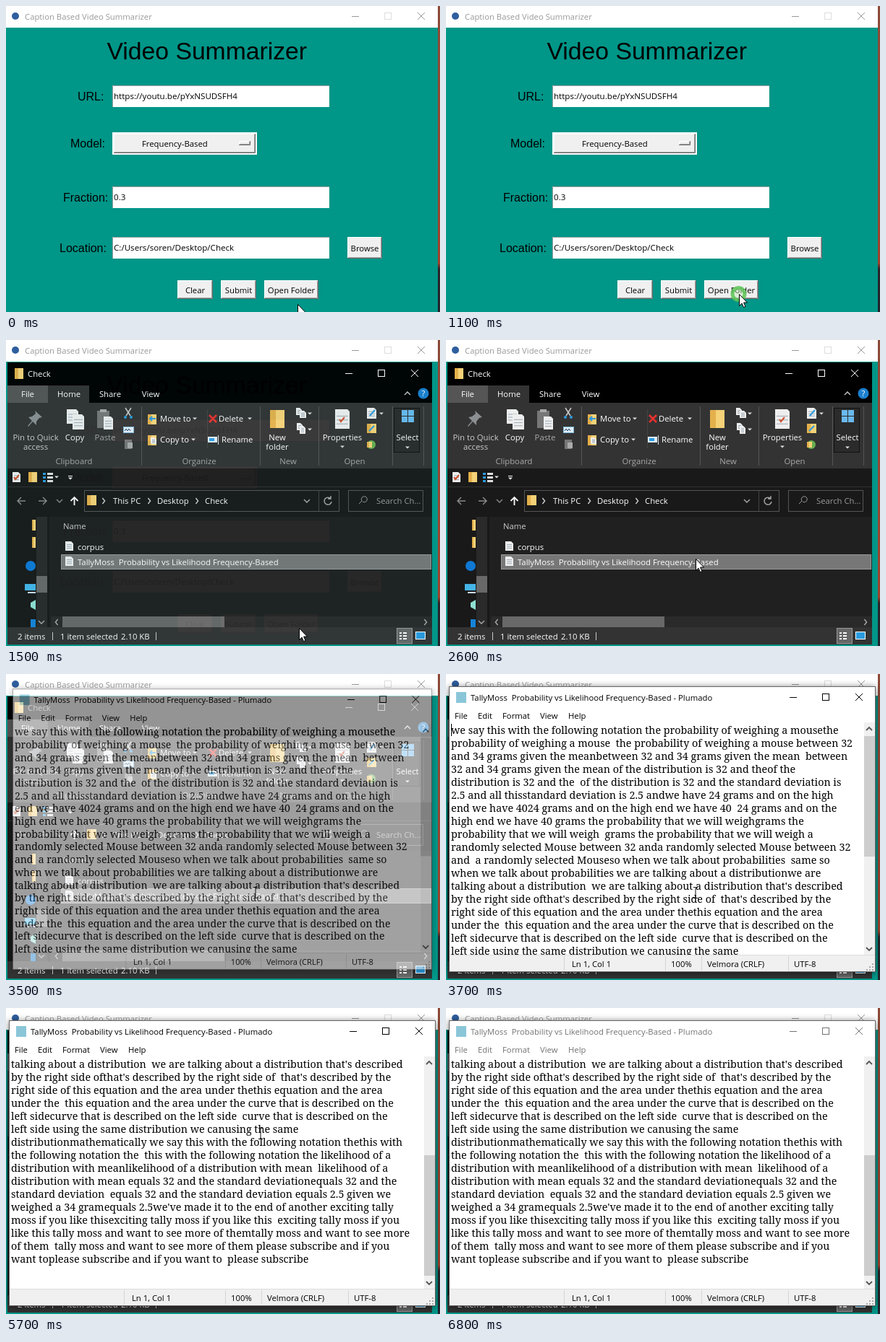
An HTML page that plays this animation: 600 by 424 pixels, repeating every 7.1 s.

```html
<!DOCTYPE html>
<html lang="en">
<head>
<meta charset="utf-8">
<style>
html, body { margin: 0; width: 100%; height: 100%; overflow: hidden; background: #009688; }
svg { display: block; }
text { white-space: pre; font: 11.3px "Open Sans", "Noto Sans", sans-serif; }
.entry { font-size: 11.6px; }
.label { font: 16px "Liberation Sans", Arial, sans-serif; }
.heading { font: 33.7px "Liberation Sans", Arial, sans-serif; }
.note { font: 14.3px "Noto Serif", "DejaVu Serif", serif; }
#pad { transform-origin: 299px 215px; filter: drop-shadow(0 1px 5px #0008); }
</style>
</head>
<body>
<svg id="stage" width="600" height="424" viewBox="0 0 600 424"></svg>
<script>
// Markup helpers
const rect = (x, y, w, h, fill, extra = '') =>
  `<rect x="${x}" y="${y}" width="${w}" height="${h}" fill="${fill}" ${extra}/>`;
const line = (d, color = '#fff', width = 1) =>
  `<path d="${d}" fill="none" stroke="${color}" stroke-width="${width}"/>`;
const shape = (d, fill) => `<path d="${d}" fill="${fill}"/>`;
const disc = (x, y, r, fill) => `<circle cx="${x}" cy="${y}" r="${r}" fill="${fill}"/>`;
const text = (x, y, s, fill = '#000', cls = '', anchor = 'start') =>
  `<text x="${x}" y="${y}" fill="${fill}" class="${cls}" text-anchor="${anchor}">${s}</text>`;
const mid = (x, y, s, fill = '#000') => text(x, y, s, fill, '', 'middle');
const group = (id, body, extra = '') => `<g id="${id}" ${extra}>${body}</g>`;
const box = (x, y, w, h, color, fill = 'none') =>
  rect(x + .5, y + .5, w - 1, h - 1, fill, `stroke="${color}"`);
const drop = (x, y, color = '#ddd') => shape(`M${x - 3} ${y - 1.5}h6l-3 3z`, color);
const chevron = (x, y, dx, dy, color = '#aaa', w = 1.4) => line(dx
  ? `M${x - 2 * dx} ${y - 4}l${4 * dx} 4l${-4 * dx} 4`
  : `M${x - 4} ${y - 2 * dy}l4 ${4 * dy}l4 ${-4 * dy}`, color, w);
const controls = (x, y, color, maxColor = color) =>
  line(`M${x} ${y + .5}h10M${x + 91} ${y - 5}l10 10m0 -10l-10 10`, color) +
  box(x + 45, y - 5, 10, 10, maxColor);

// Main form
const bevel = (x, y, w, h) => rect(x, y, w, h, '#f0f0f0') +
  line(`M${x + .5} ${y + h}V${y + .5}H${x + w}`) +
  line(`M${x + 1} ${y + h - 1.5}H${x + w - 1.5}V${y + 1}`, '#a0a0a0') +
  line(`M${x} ${y + h - .5}H${x + w - .5}V${y}`, '#696969');
const button = (x, y, w, h, s) => bevel(x, y, w, h) + mid(x + w / 2, y + h / 2 + 4.5, s);
const entry = (y, s) => rect(147, y, 300, 30, '#fff') +
  line(`M147.5 ${y + 30}V${y + .5}H447`, '#a0a0a0') + text(149, y + 19, s, '#000', 'entry');

const form = rect(0, 0, 597, 30, '#fff') + rect(597, 0, 3, 424, 'url(#edge)') +
  rect(0, 30, 597, 394, '#009688') + disc(13, 14, 5, '#2f5f9e') +
  text(26, 19, 'Caption Based Video Summarizer', '#999') + controls(478, 14, '#999', '#ddd') +
  text(139.5, 74, 'Video Summarizer', '#000', 'heading') +
  [[99, 131, 'URL:'], [89, 196, 'Model:'], [79, 271, 'Fraction:'], [74, 341, 'Location:']]
    .map(([x, y, s]) => text(x, y, s, '#000', 'label')).join('') +
  entry(110, 'https://youtu.be/pYxNSUDSFH4') + entry(250, '0.3') +
  entry(320, 'C:/Users/soren/Desktop/Check') +
  rect(147, 175, 200, 31, '#fff') + bevel(149, 177, 196, 27) + bevel(322, 187, 16, 6) +
  text(188, 195, 'Frequency-Based') +
  button(472, 320, 48, 30, 'Browse') + button(237, 380, 49, 26, 'Clear') +
  button(297, 380, 49, 26, 'Submit') + button(357, 380, 75, 26, 'Open Folder');

// File browser
const yellow = '#f5d177', blue = '#2b9be0';
const folder = (x, y, w = 13, h = 14) => rect(x, y, w, h, yellow) + rect(x, y, w / 2.5, h, '#e3b04b');
const page = (x, y, w = 11, h = 13) => shape(`M${x} ${y}h${w - 3}l3 3v${h - 3}h${-w}z`, '#eee') +
  [.35, .55, .75].map(k => line(`M${x + 2} ${y + h * k}h${w - 4}`, '#8a9aa8', .8)).join('');
const check = (x, y) => line(`M${x - 3} ${y}l2 3 5 -6`, '#d0502c', 2);

const ribbon = rect(2, 87, 587, 91, '#333') +
  [187, 351, 432, 534, 577].map(x => line(`M${x}.5 92v82`, '#555')).join('') +
  shape('M40 98l10 9-4 1-4 5 0 5-5-5-6 7-1-1 6-7-5-5 5-1 5-4z', '#8b8f92') +
  mid(41, 139, 'Pin to Quick', '#ccc') + mid(41, 152, 'access', '#ccc') +
  page(84, 96, 16, 20) + page(92, 103, 16, 21) + mid(95, 139, 'Copy', '#fff') +
  rect(126, 98, 17, 24, '#777') + rect(130, 96, 9, 4, '#aaa') + page(135, 106, 13, 18) +
  mid(137, 139, 'Paste', '#aaa') +
  line('M165 94l7 11m1 -11l-7 11', '#ccc', 1.5) + disc(165, 107, 2, blue) + disc(173, 107, 2, blue) +
  box(162, 120, 15, 9, '#7fb8dc', '#dfeefa') + line('M164 126l2 -3 2 3 2 -3 2 3', '#246', 1) +
  rect(164, 138, 10, 13, '#777') + rect(168, 142, 7, 8, '#aaa') +
  mid(94, 172, 'Clipboard', '#aaa') +
  folder(196, 103, 12) + line('M207 109h-8m3 -3l-3 3 3 3', blue, 2) + text(213, 113, 'Move to', '#fff') + drop(261, 109) +
  folder(196, 132, 12) + page(200, 135, 8, 9) + text(213, 142, 'Copy to', '#fff') + drop(259, 138) +
  line('M281 104l10 10m0 -10l-10 10', '#e0322e', 2.8) + text(294, 113, 'Delete', '#fff') + drop(337, 109) +
  rect(279, 134, 13, 8, '#dcecf8') + rect(281, 136, 7, 4, blue) + line('M293.5 132v13', '#ddd') +
  text(298, 142, 'Rename', '#fff') + line('M278.5 96v54', '#444') + mid(267, 172, 'Organize', '#aaa') +
  folder(365, 97, 20, 25) + mid(375, 139, 'New', '#fff') + mid(375, 152, 'folder', '#fff') +
  page(401, 94, 8, 10) + page(406, 98, 9, 10) + drop(420, 102) +
  page(402, 115, 8, 10) + page(406, 119, 8, 11) + drop(420, 124) + mid(390, 172, 'New', '#aaa') +
  page(455, 96, 20, 27) + check(464, 110) + mid(465, 139, 'Properties', '#fff') + drop(465, 148) +
  page(499, 94, 13, 15) + line('M503 105l7 -8', blue, 2) + drop(519, 102) +
  folder(499, 116, 13, 13) + line('M502 126l7 -7', blue, 2) +
  disc(505, 145, 6, '#69ae50') + folder(499, 141, 7, 8) + mid(482, 172, 'Open', '#aaa') +
  box(536, 94, 36, 62, '#111', '#2b2b2b') +
  [0, 9].map(a => [0, 9].map(b => rect(547 + a, 97 + b, 8, 8, '#69b9ef')).join('')).join('') +
  mid(555, 139, 'Select', '#fff') + drop(555, 149);

const explorer = rect(2, 31, 587, 391, '#202020') + rect(2, 31, 587, 57, '#000') +
  folder(12, 39, 12, 15) +
  group('active', text(30, 51, 'Check', '#fff') + controls(469, 46, '#fff')) +
  group('idle', text(30, 51, 'Check', '#999') + controls(469, 46, '#999')) +
  rect(2, 63, 56, 24, '#555') + rect(58, 63, 57, 24, '#333') +
  [[30, 'File'], [87, 'Home'], [144, 'Share'], [200, 'View']].map(([x, s]) => mid(x, 79, s, '#fff')).join('') +
  chevron(555, 74, 0, -1, '#ccc') + disc(577, 74, 7.5, '#1c80cf') + mid(577, 78, '?', '#fff') + ribbon +
  rect(2, 178, 587, 67, '#191919') + line('M2 203.5h587', '#303030') +
  page(9, 183, 11, 14) + check(14, 190) + folder(31, 183, 12) +
  [0, 5, 10].map(d => rect(51, 184 + d, 4, 3, blue) + rect(57, 184 + d, 8, 3, '#ddd')).join('') +
  drop(70, 190) + drop(89, 192, '#fff') + line('M86 188.5h6') +
  line('M27 223h-11m5 -5l-5 5 5 5M45 223h11m-5 -5l5 5 -5 5', '#888', 1.5) + chevron(74, 223, 0, 1, '#888') +
  line('M94.5 229v-11m-5 5l5 -5 5 5', '#fff', 1.8) +
  box(108, 208, 353, 30, '#555') + folder(112, 215) + line('M432.5 209v28', '#444') +
  [135, 198, 264].map(x => chevron(x, 223, .8, 0, '#ccc')).join('') +
  text(148, 227, 'This PC', '#fff') + text(209, 227, 'Desktop', '#fff') + text(275, 227, 'Check', '#fff') +
  chevron(416, 223, 0, 1) + line('M449 220a5 5 0 1 0 1 4M449 216v4h-4', '#aaa', 1.4) +
  box(473, 208, 104, 30, '#555') + line('M488 227l4 -4m0 0a4 4 0 1 1 1 1', '#999') +
  text(512, 227, 'Search Ch...', '#999') +
  rect(2, 245, 58, 153, '#191919') + folder(36, 249, 5, 15) + folder(36, 273, 5, 15) +
  disc(34, 313, 7, '#0f78d4') + rect(26, 338, 15, 9, '#45b5e8') + rect(30, 349, 11, 2, '#cde') +
  shape('M34 364l7 -4v14l-7 -4z', '#8edfd2') + rect(34, 387, 7, 11, '#1683d8') +
  rect(42, 245, 15, 153, '#2a2a2a') + rect(42, 327, 15, 23, '#686868') + chevron(49, 391, 0, 1) +
  text(79, 262, 'Name', '#ccc') + page(82, 279) + text(99, 291, 'corpus', '#fff') +
  box(76, 297, 512, 21, '#999', '#777') + page(82, 300) +
  text(99, 312, 'TallyMoss  Probability vs Likelihood Frequency-Based', '#fff') +
  rect(62, 383, 527, 15, '#2a2a2a') + rect(78, 383, 224, 15, '#686868') +
  chevron(70, 391, -.8, 0) + chevron(580, 391, .8, 0) +
  rect(2, 398, 587, 24, '#333') + text(16, 415, '2 items', '#fff') +
  text(75, 415, '1 item selected', '#fff') + text(159, 415, '2.10 KB', '#fff') +
  line('M64.5 405v11M207.5 405v11', '#ccc') + box(540, 399, 22, 22, '#999', '#666') +
  [405, 409, 413].map(y => rect(544, y, 3, 2, '#fff') + rect(549, y, 5, 2, '#fff')).join('') +
  box(566, 404, 14, 11, '#fff', blue);

// Text editor
const lines = `we say this with the following notation the probability of weighing a mousethe
probability of weighing a mouse  the probability of weighing a mouse between 32
and 34 grams given the meanbetween 32 and 34 grams given the mean  between
32 and 34 grams given the mean of the distribution is 32 and theof the
distribution is 32 and the  of the distribution is 32 and the standard deviation is
2.5 and all thisstandard deviation is 2.5 andwe have 24 grams and on the high
end we have 4024 grams and on the high end we have 40  24 grams and on the
high end we have 40 grams the probability that we will weighgrams the
probability that we will weigh  grams the probability that we will weigh a
randomly selected Mouse between 32 anda randomly selected Mouse between 32
and  a randomly selected Mouseso when we talk about probabilities  same so
when we talk about probabilities we are talking about a distributionwe are
talking about a distribution  we are talking about a distribution that's described
by the right side ofthat's described by the right side of  that's described by the
right side of this equation and the area under thethis equation and the area
under the  this equation and the area under the curve that is described on the
left sidecurve that is described on the left side  curve that is described on the
left side using the same distribution we canusing the same
distributionmathematically we say this with the following notation thethis with
the following notation the  this with the following notation the likelihood of a
distribution with meanlikelihood of a distribution with mean  likelihood of a
distribution with mean equals 32 and the standard deviationequals 32 and the
standard deviation  equals 32 and the standard deviation equals 2.5 given we
weighed a 34 gramequals 2.5we've made it to the end of another exciting tally
moss if you like thisexciting tally moss if you like this  exciting tally moss if you
like this tally moss and want to see more of themtally moss and want to see more
of them  tally moss and want to see more of them please subscribe and if you
want toplease subscribe and if you want to  please subscribe`.split('\n');

const head = text(34, 37, 'TallyMoss  Probability vs Likelihood Frequency-Based - Plumado') +
  [[12, 'File'], [44, 'Edit'], [78, 'Format'], [130, 'View'], [169, 'Help']]
    .map(([x, s]) => text(x, 62, s)).join('') + controls(475, 32, '#000');

const editor = box(4, 17, 590, 396, '#666', '#fff') + rect(14, 25, 14, 15, '#8ac6d8') +
  group('head', head) +
  group('view', group('body', lines.map((s, i) => text(7, 83 + 18 * i, s, '#000', 'note')).join('') +
    group('caret', line('M7.5 69v17', '#000'))), 'clip-path="url(#page)"') +
  rect(578, 67, 15, 322, '#f0f0f0') + rect(578, 86, 15, 167, '#cdcdcd', 'id="thumb"') +
  chevron(585, 76, 0, -1, '#555', 1.8) + chevron(585, 381, 0, 1, '#555', 1.8) +
  rect(5, 389, 588, 23, '#f0f0f0') + line('M5 389.5h588', '#ddd') +
  [163, 303, 353, 473].map(x => line(`M${x}.5 391v20`, '#d5d5d5')).join('') +
  [[174, 'Ln 1, Col 1'], [311, '100%'], [361, 'Velmora (CRLF)'], [481, 'UTF-8']]
    .map(([x, s]) => text(x, 406, s)).join('') +
  [[590, 402], [590, 406], [586, 406], [590, 410], [586, 410], [582, 410]]
    .map(([x, y]) => rect(x - 1, y - 1, 2, 2, '#aaa')).join('');

const pointers = group('ring', `<circle cx="404.5" cy="399" r="8.5" fill="#bfe8b8" fill-opacity=".45"
    stroke="#5cc455" stroke-opacity=".85" stroke-width="5"/>`) +
  group('arrow', '<path d="M.5 .5V16.5L4 13 6.5 18.5 9 17.5 6.6 12H11.5Z" fill="#fff" stroke="#000"/>' +
    group('busy', '<circle cx="17" cy="11" r="4.5" fill="none" stroke="#58b4e8" stroke-width="2.5"/>' +
      '<circle id="spin" r="1.5" fill="#d8f0fc"/>')) +
  group('beam', line('M-3 -7.5h2.5l.5 .5 .5 -.5h2.5M0 -7v14M-3 7.5h2.5l.5 -.5 .5 .5h2.5', '#111'));

const stage = document.getElementById('stage');
stage.innerHTML = `<defs><clipPath id="page"><rect x="5" y="69" width="573" height="320"/></clipPath>
  <linearGradient id="edge" x2="0" y2="1"><stop stop-color="#8c4a38"/><stop offset=".84" stop-color="#a0422c"/>
  <stop offset=".86" stop-color="#2a2428"/><stop offset="1" stop-color="#20242c"/></linearGradient></defs>` +
  form + group('folder', explorer) + group('pad', editor) + pointers;

// Timeline, in ticks of 100 ms
const $ = id => document.getElementById(id);
const show = (id, on) => $(id).setAttribute('visibility', on ? 'visible' : 'hidden');
const place = (id, x, y) => $(id).setAttribute('transform', `translate(${x} ${y})`);
const at = (list, i) => list[Math.max(0, Math.min(list.length - 1, i))];
const toButton = [[403, 413], [406, 409], [412, 400], [419, 390], [412, 394], [405, 399]];
const leave = [[345, 303], [352, 174], [356, 157], [338, 216], [292, 306], [240, 385], [199, 440]];

function arrowAt(tick) {
  if (tick < 19) return at(toButton, tick);
  const k = Math.min(1, (tick - 18) / 8), e = k * k * (3 - 2 * k);
  return [405 - 60 * e, 399 - 96 * e];
}

function draw(tick) {
  const fade = at([0, .2, .6, .96, 1], tick - 12);
  const open = at([0, .1, .3, .58, .88, 1], tick - 32);
  const scroll = Math.max(0, Math.min(12, 3 * (tick - 40)));
  $('folder').setAttribute('opacity', fade);
  show('active', tick < 33);
  show('idle', tick >= 33);
  $('pad').style.opacity = open;
  $('pad').style.transform = `scale(${1 - .04 * (1 - open)})`;
  $('head').setAttribute('opacity', tick >= 68 ? .55 : 1);
  place('body', 0, -18 * scroll);
  $('thumb').setAttribute('y', 86 + 118 * scroll / 12);
  show('caret', tick >= 37 && tick < 39);
  show('ring', tick >= 11 && tick < 13);
  show('arrow', tick < 34);
  show('busy', tick >= 28 && tick < 34);
  show('beam', tick >= 34 && tick < 62);
  place('arrow', ...arrowAt(tick));
  place('spin', 17 + 4.5 * Math.cos(tick), 11 + 4.5 * Math.sin(tick));
  place('beam', ...at(leave, tick - 56));
}

const start = performance.now();
function frame() {
  draw(Math.floor((performance.now() - start) % 7100 / 100));
  requestAnimationFrame(frame);
}
frame();
</script>
</body>
</html>
```
